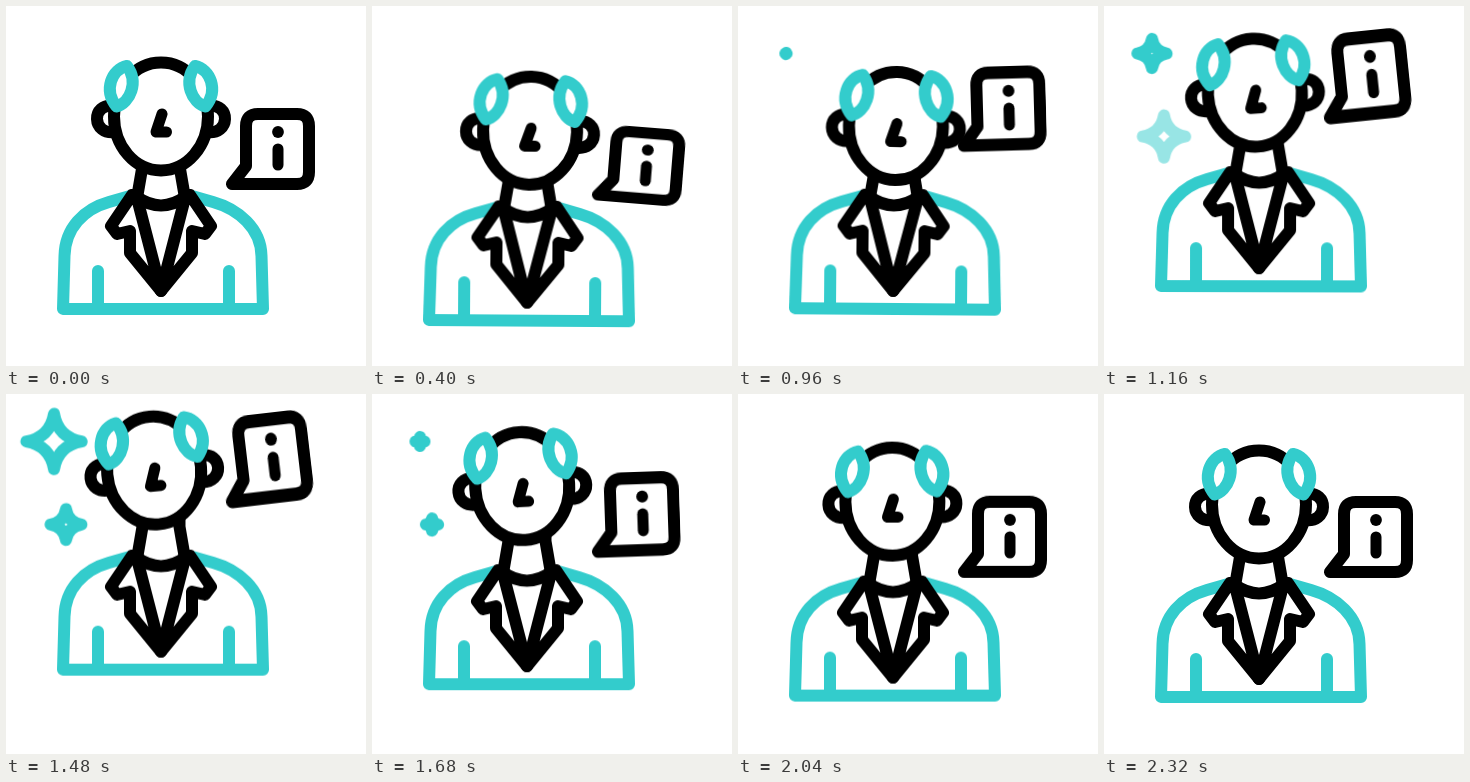
An HTML page for the animation above (2.4 s loop, 360 by 360 pixels).

```html
<!DOCTYPE html>
<html lang="en">
<head>
<meta charset="utf-8">
<title>Advisor</title>
<style>
  html, body { margin: 0; width: 100%; height: 100%; overflow: hidden; background: #fff; }
  svg { display: block; width: 100vw; height: 100vh; }
  .line { fill: none; stroke: #000; stroke-width: 12; stroke-linecap: round; stroke-linejoin: round; }
  .teal { stroke: #33cccc; }
  .white { fill: #fff; }
  .thin { stroke-width: 11; }

  .body, .head, .bubble, .star { animation: 2400ms infinite; }
  .body { transform-origin: 155px 303px; animation-name: bounce; }
  .head { transform-origin: 155px 190px; animation-name: nod, tilt; }
  .bubble { transform-origin: 226px 178px; animation-name: swing; }
  .star { vector-effect: non-scaling-stroke; }
  .big { animation-name: grow; }
  .small { animation-name: shrink; }

  @keyframes bounce {
    0%, 8.4% { transform: none; animation-timing-function: cubic-bezier(.33, 0, .4, 1); }
    32.3% { transform: translateY(29px) rotate(.9deg); animation-timing-function: cubic-bezier(.33, 0, .1, 1); }
    59% { transform: translateY(-28px) rotate(0deg); animation-timing-function: cubic-bezier(.3, 0, .1, 1); }
    96.67%, 100% { transform: none; }
  }
  @keyframes nod {
    0%, 8.4% { translate: 0 0; animation-timing-function: cubic-bezier(.6, 0, .6, 1); }
    31.67% { translate: 1px 15.5px; animation-timing-function: cubic-bezier(.33, 0, .45, 1); }
    61% { translate: 0 -7px; animation-timing-function: cubic-bezier(.33, 0, .6, 1); }
    96.67%, 100% { translate: 0 0; }
  }
  @keyframes tilt {
    0%, 8.4% { rotate: 0deg; animation-timing-function: cubic-bezier(.33, 0, .4, 1); }
    31.67% { rotate: 3deg; animation-timing-function: cubic-bezier(.33, 0, .4, 1); }
    60% { rotate: -5deg; animation-timing-function: cubic-bezier(.33, 0, .3, 1); }
    96.67%, 100% { rotate: 0deg; }
  }
  @keyframes swing {
    0%, 8.4% { transform: none; animation-timing-function: cubic-bezier(.33, 0, .1, 1); }
    30.5% { transform: translateY(16px) rotate(6.8deg) scaleY(.91); animation-timing-function: cubic-bezier(.33, 0, .1, 1); }
    59.2% { transform: translateY(-73.5px) rotate(-7deg) scaleY(1.11); animation-timing-function: cubic-bezier(.3, 0, .1, 1); }
    86.7%, 100% { transform: none; }
  }
  @keyframes grow {
    0%, 38% { transform: scale(0); animation-timing-function: cubic-bezier(.4, 0, .6, 1); }
    59% { transform: scale(1.08); animation-timing-function: cubic-bezier(.4, 0, .6, 1); }
    74%, 100% { transform: scale(0); }
  }
  @keyframes shrink {
    0%, 42% { transform: scale(.92); opacity: 0; }
    48.33% { transform: scale(.77); opacity: .5; animation-timing-function: linear; }
    54% { transform: scale(.7); opacity: 1; animation-timing-function: linear; }
    61.67% { transform: scale(.56); opacity: 1; animation-timing-function: ease-in; }
    73%, 100% { transform: scale(0); opacity: 1; }
  }
</style>
</head>
<body>
<svg viewBox="0 0 360 360">
  <defs>
    <path id="ear" d="M108 100C85 96 85 130 110 126"/>
    <path id="hair" d="M121 60C106 63 97 84 110.5 100.5C124 97 133 76 121 60Z"/>
    <path id="lapel" d="M126 189L105 220L111 228L124 225V247L155 285L131 192L136.5 160V140"/>
  </defs>

  <g transform="translate(48 47.5)">
    <path class="line teal star big" d="M0-27.5Q4-4 27.5 0Q4 4 0 27.5Q-4 4-27.5 0Q-4-4 0-27.5Z"/>
  </g>
  <g transform="translate(60 130.5)">
    <path class="line teal star small" d="M0-27.5Q4-4 27.5 0Q4 4 0 27.5Q-4 4-27.5 0Q-4-4 0-27.5Z"/>
  </g>

  <g class="bubble line">
    <path d="M226 178H291Q303 178 303 166V120Q303 108 291 108H252Q240 108 240 120V160Z"/>
    <path class="thin" d="M272 143V159"/>
    <circle cx="272" cy="126" r="5.9" fill="#000" stroke="none"/>
  </g>

  <g class="body line">
    <path class="teal" d="M124 190L103 196C78 203 59 222 58.5 250L57 303H257L255.5 250C255 222 232 203 207 196L186 190M92 265V303M223 265V303"/>
    <use href="#lapel"/>
    <use href="#lapel" transform="matrix(-1 0 0 1 310 0)"/>
    <path d="M131 191Q155 208 179 191"/>
    <g class="head">
      <use href="#ear"/>
      <use href="#ear" transform="matrix(-1 0 0 1 310 0)"/>
      <ellipse class="white" cx="155" cy="110.5" rx="47" ry="54"/>
      <path class="thin" d="M156 108L150 126H160.5"/>
      <g class="teal white">
        <use href="#hair"/>
        <use href="#hair" transform="matrix(-1 0 0 1 310 0)"/>
      </g>
    </g>
  </g>
</svg>
</body>
</html>
```
